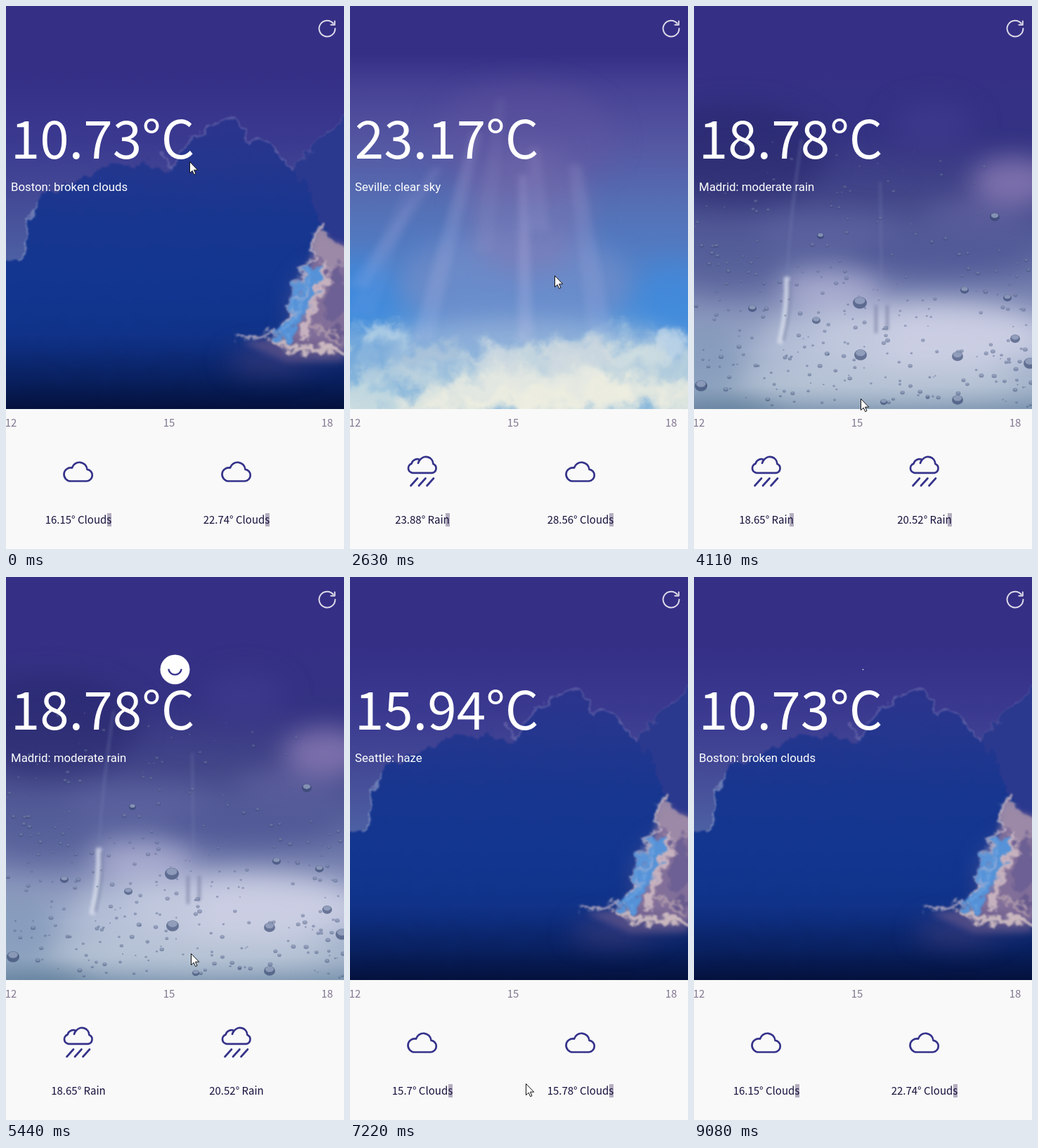
Write an HTML page that moves like this. It is 481 px wide and 772 px high and loops after 9160 ms.

```html
<!DOCTYPE html>
<html lang="en">
<head>
<meta charset="utf-8">
<title>Weather</title>
<style>
html, body { margin: 0; width: 100%; height: 100%; overflow: hidden; background: #f9f9f9; }
svg { position: absolute; left: 0; top: 0; width: 481px; height: 772px; display: block; }
.photo { will-change: transform; }
filter { color-interpolation-filters: sRGB; }
text { font-family: "Noto Sans CJK JP", "Noto Sans CJK SC", "Noto Sans", sans-serif; white-space: pre; }
#temp { font-size: 74.6px; fill: #fff; }
#place { font: 16.8px Roboto, sans-serif; fill: #fff; }
.hour { font-size: 15px; fill: #827691; text-anchor: middle; }
.label { font-size: 15px; fill: #14113c; text-anchor: middle; }
.icon { fill: none; stroke: #35338a; stroke-width: 2.7; stroke-linecap: round; stroke-linejoin: round; }
</style>
</head>
<body>
<svg class="photo" viewBox="0 0 481 772">
  <defs>
    <filter id="rough" x="-10%" y="-10%" width="120%" height="120%">
      <feTurbulence type="fractalNoise" baseFrequency=".045" numOctaves="4" seed="4"/>
      <feDisplacementMap in="SourceGraphic" scale="24" xChannelSelector="R" yChannelSelector="G"/>
      <feGaussianBlur stdDeviation=".9"/>
    </filter>
    <filter id="ragged" x="-20%" y="-20%" width="140%" height="140%">
      <feGaussianBlur stdDeviation="1.5" result="b"/>
      <feTurbulence type="fractalNoise" baseFrequency=".06" numOctaves="4" seed="11"/>
      <feDisplacementMap in="b" scale="32" xChannelSelector="R" yChannelSelector="G"/>
      <feGaussianBlur stdDeviation=".8"/>
    </filter>
    <filter id="puffy" x="-10%" y="-10%" width="120%" height="120%">
      <feGaussianBlur stdDeviation="7" result="b"/>
      <feTurbulence type="fractalNoise" baseFrequency=".03" numOctaves="4" seed="8"/>
      <feDisplacementMap in="b" scale="50" xChannelSelector="R" yChannelSelector="G"/>
    </filter>
    <filter id="soft" x="-50%" y="-50%" width="200%" height="200%"><feGaussianBlur stdDeviation="18"/></filter>
    <filter id="mist" x="-50%" y="-50%" width="200%" height="200%"><feGaussianBlur stdDeviation="5"/></filter>
    <filter id="wetness" x="-50%" y="-50%" width="200%" height="200%"><feGaussianBlur stdDeviation="2"/></filter>
    <filter id="blur"><feGaussianBlur stdDeviation=".7"/></filter>
    <clipPath id="frame"><rect width="481" height="573"/></clipPath>
  </defs>
  <g id="photos" clip-path="url(#frame)"></g>
</svg>
<svg viewBox="0 0 481 772">
  <rect y="573" width="481" height="199" fill="#f9f9f9"/>
  <g fill="none" stroke="#dcd9e8" stroke-width="2" stroke-linecap="round" stroke-linejoin="round">
    <path d="M468.4 32A11.4 11.4 0 1 1 465.8 24.8"/>
    <path d="M467.8 21.5V26.8H462.4"/>
  </g>
  <text id="temp" x="6.8" y="216.6"></text>
  <text id="place" x="7" y="262.5"></text>
  <text class="hour" x="7" y="598">12</text>
  <text class="hour" x="232" y="598">15</text>
  <text class="hour" x="457" y="598">18</text>
  <g id="cards"></g>
  <g id="pull">
    <circle r="28" fill="#fff"/>
    <path d="M-12.3 -1A12.4 12.4 0 0 0 12.3 -1" fill="none" stroke="#35338a" stroke-width="3"/>
  </g>
  <path id="cursor" d="M.5 .5V16.6L4.2 13.2L6.7 18.7L9 17.6L6.5 12.2H11.7Z" fill="#fff" stroke="#111" stroke-width="1"/>
</svg>
<script>
const LOOP = 9160;
const $ = id => document.getElementById(id);

function rng(seed) {
  return () => (seed = (seed * 16807) % 2147483647) / 2147483647;
}
const repeat = (n, fn) => Array.from({ length: n }, (_, i) => fn(i)).join('');

function gradient(id, stops) {
  const marks = stops.map(([y, c, o = 1]) => `<stop offset="${y / 573}" stop-color="${c}" stop-opacity="${o}"/>`);
  return `<linearGradient id="${id}" gradientUnits="userSpaceOnUse" x1="0" y1="0" x2="0" y2="573">${marks.join('')}</linearGradient>`;
}
const fillAll = id => `<rect width="481" height="573" fill="url(#${id})"/>`;
const blob = (x, y, rx, ry, c, o = 1) => `<ellipse cx="${x}" cy="${y}" rx="${rx}" ry="${ry}" fill="${c}" opacity="${o}"/>`;
const shape = (d, c, o = 1) => `<path d="${d}" fill="${c}" opacity="${o}"/>`;
const line = (d, c, w, o = 1) => `<path d="${d}" fill="none" stroke="${c}" stroke-width="${w}" opacity="${o}" stroke-linejoin="round"/>`;
const group = (filter, ...parts) => `<g filter="url(#${filter})">${parts.join('')}</g>`;

function cloudy() {
  const top = 'M-20 372L22 366L30 340Q30 300 46 280Q60 258 90 258Q115 232 160 226Q205 216 232 236Q262 180 300 165Q340 154 346 198Q366 180 384 200Q390 222 412 234Q430 250 440 290L449 312';
  const body = top + 'L455 345L500 360V600H-20Z';
  const ridge = 'M412 234Q424 205 445 190Q462 180 500 145';
  return gradient('dusk', [[0, '#352f85'], [95, '#352f86'], [190, '#3a3990'], [265, '#434895'], [360, '#4d60a3']]) +
    gradient('mass', [[155, '#2d348c'], [230, '#23368e'], [300, '#18368f'], [400, '#123690'], [490, '#0f3186'], [573, '#0a2766']]) +
    gradient('night', [[465, '#020b36', 0], [530, '#020b36', .35], [573, '#020a30', .75]]) +
    fillAll('dusk') +
    group('rough', shape(ridge + 'V360H412Z', '#2a388e'), shape(body, 'url(#mass)'),
      line(ridge, '#6464a6', 2, .5),
      line('M222 206L232 236Q262 180 300 165Q340 154 346 198Q366 180 384 200Q390 222 412 234', '#7b79b4', 2.5, .55),
      line('M22 366L30 340Q30 300 46 280', '#8794c4', 3, .7)) +
    fillAll('night') +
    group('soft', blob(455, 435, 45, 60, '#806b94', .6), blob(375, 505, 60, 16, '#5a4c86', .55)) +
    group('mist', shape('M447 318L462 335L500 345V490L440 492L400 482L408 440L425 390Z', '#85719a', .95),
      shape('M335 478L400 470L481 480V505L400 506Z', '#6d5b8d', .6)) +
    group('ragged',
      shape('M448 306L460 332L500 348V365L470 372L448 366L438 345Z', '#a08da9', .9),
      blob(470, 412, 14, 38, '#665b92', .75), blob(472, 462, 20, 8, '#5f5389', .7),
      line('M448 308L439 345L418 388L404 432L386 466L350 473L326 470', '#d9c8d0', 4, .85),
      line('M460 366L444 402L430 446L424 470', '#d9c4c8', 11, .8),
      line('M384 474L408 488L440 484L490 492', '#e2cfcb', 10, .8),
      line('M430 450L452 462L480 476', '#c6afb5', 5, .7),
      shape('M430 370L456 375L442 397L428 432L416 456L406 478L390 472L381 465L402 440L412 402Z', '#5592d8'),
      line('M436 373L420 402L411 440L397 467', '#7fb0e4', 4, .55),
      line('M428 398L416 416M414 432L398 446', '#b9b4cf', 4, .7));
}

function sunny() {
  const rand = rng(77);
  const ray = (x1, y1, x2, y2, w, o) =>
    shape(`M${x1 - w / 4} ${y1}L${x1 + w / 4} ${y1}L${x2 + w / 2} ${y2}L${x2 - w / 2} ${y2}Z`, '#cfc6ea', o);
  const puffs = (n, y, spread, c, o) => repeat(n, i => {
    const x = i / (n - 1) * 520 - 20;
    return blob(x, y + (rand() - .5) * spread, 18 + rand() * 24, 12 + rand() * 18, c, o);
  });
  return gradient('day', [[0, '#352f85'], [68, '#353086'], [120, '#484395'], [200, '#5558a3'], [290, '#5571b6'], [370, '#5080c8'], [440, '#4a8ed8'], [573, '#8bb9dc']]) +
    fillAll('day') +
    group('soft', blob(235, 395, 165, 75, '#7d8fc6', .6), blob(250, 290, 90, 90, '#8577b0', .45), blob(250, 190, 130, 80, '#67589f', .35),
      blob(8, 410, 55, 50, '#388ae3', .6), blob(460, 415, 50, 50, '#3c8be0', .6), blob(250, 480, 210, 32, '#a9bfdc', .65)) +
    group('mist', ray(180, 180, 103, 475, 30, .16), ray(125, 230, 10, 400, 28, .12), ray(85, 260, 15, 440, 40, .07),
      ray(246, 240, 250, 480, 22, .2), ray(262, 200, 270, 320, 30, .1), ray(320, 225, 358, 480, 36, .12),
      ray(215, 130, 190, 350, 28, .06)) +
    group('puffy', puffs(13, 490, 34, '#a9c8e0', .5), puffs(12, 520, 30, '#cfdddf', .65),
      blob(48, 468, 36, 14, '#bdd6e7', .8), blob(464, 478, 30, 18, '#c3d8e8', .85), blob(410, 495, 44, 17, '#d5e1e2', .8),
      blob(215, 500, 46, 20, '#d8dfe0', .75), blob(325, 497, 55, 20, '#d9dfe0', .8), blob(120, 497, 50, 16, '#b2c7d9', .7),
      blob(270, 545, 130, 28, '#eeeee2', .85), puffs(13, 560, 18, '#f0efe0', .8), blob(25, 555, 45, 22, '#b4d3e0', .6));
}

function rainy() {
  const rand = rng(2024);
  const drop = (x, y, r, o) =>
    blob(x, y, r, r * .85, '#34456f', o) + blob(x, y - r * .3, r * .75, r * .5, '#a9b5d0', o);
  const small = repeat(300, () => {
    const y = 140 + Math.sqrt(rand()) * 430;
    return drop(rand() * 481, y, 1 + rand() * 2.6, .12 + .35 * (y - 140) / 430);
  });
  const large = [[236, 422, 10], [237, 496, 9], [375, 498, 8], [10, 540, 9], [478, 508, 9], [446, 415, 6], [457, 473, 7],
    [385, 404, 6], [375, 560, 8], [174, 447, 6], [428, 300, 7], [83, 430, 6], [270, 563, 5], [180, 327, 5]];
  return gradient('storm', [[0, '#352f85'], [90, '#353085'], [180, '#343283'], [270, '#434789'], [350, '#5a649d'], [420, '#7e89b4'], [490, '#a6b3ce'], [540, '#a3b4ca'], [573, '#7f97b1']]) +
    fillAll('storm') +
    group('soft', blob(60, 210, 130, 70, '#28286d', .6), blob(455, 250, 60, 34, '#8d7cb6', .8), blob(340, 170, 60, 35, '#423d90', .6),
      blob(400, 295, 70, 22, '#6a68a6', .5), blob(190, 320, 100, 25, '#6469a5', .5), blob(350, 355, 130, 30, '#4d5594', .65),
      blob(50, 370, 80, 40, '#4c5792', .5), blob(195, 402, 75, 24, '#b4b5d6', .8), blob(340, 470, 170, 48, '#d0d2e6', .9),
      blob(190, 470, 90, 45, '#bcc6dc', .7), blob(270, 535, 200, 28, '#c3cedd', .6),
      blob(15, 500, 60, 50, '#7690b3', .6), blob(40, 580, 80, 18, '#4f708f', .6)) +
    group('wetness', line('M153 190Q138 290 132 385', '#7781b4', 2.5, .5), line('M132 385Q134 430 122 480', '#dde2ef', 8, .75),
      line('M136 390Q138 432 127 476', '#5b678f', 3, .6), line('M265 250L267 400', '#7a84b5', 3, .35),
      line('M259 425V465M275 425V460', '#7a80a4', 4, .7)) +
    group('blur', small, ...large.map(([x, y, r]) => drop(x, y, r, .65)));
}

const scenes = { cloudy, sunny, rainy };
$('photos').innerHTML = Object.keys(scenes).map(k => `<g id="${k}">${scenes[k]()}</g>`).join('');

const CLOUD = 'M-11 675.5H12A8.4 8.4 0 0 0 12.5 658.8A11 11 0 0 0 -9 656.6A9.55 9.55 0 1 0 -11 675.5Z';
const SHOWER = 'M-14 663.8A6.8 6.8 0 0 1 -15.4 650.6A8.4 8.4 0 0 1 -3.4 645.2A10.4 10.4 0 0 1 15.4 651A6.7 6.7 0 0 1 14 663.8ZM-3.4 645.2Q-5.4 647.2 -6 650';
$('cards').innerHTML = [103, 328].map(x => `
  <g class="icon" transform="translate(${x} 0)">
    <path class="dry" d="${CLOUD}"/>
    <path class="wet" d="${SHOWER}M-16.5 682L-7 671.5M-5 682L4.5 671.5M6.5 682L16 671.5"/>
  </g>
  <rect class="mark" y="721" width="6" height="19" fill="#b4adbf"/>
  <text class="label" x="${x}" y="736"></text>`).join('');
const all = name => [...document.querySelectorAll('.' + name)];
const dry = all('dry'), wet = all('wet'), marks = all('mark'), labels = all('label');

const boston = { temp: '10.73', place: 'Boston: broken clouds', scene: 'cloudy', next: ['16.15° Clouds', '22.74° Clouds'] };
const reports = [
  [0, boston],
  [1310, { temp: '23.17', place: 'Seville: clear sky', scene: 'sunny', next: ['23.88° Rain', '28.56° Clouds'] }],
  [3500, { temp: '18.78', place: 'Madrid: moderate rain', scene: 'rainy', next: ['18.65° Rain', '20.52° Rain'] }],
  [5900, { temp: '15.94', place: 'Seattle: haze', scene: 'cloudy', next: ['15.7° Clouds', '15.78° Clouds'] }],
  [8850, boston]
];
// Pointer pressed, circle starts to grow, new report arrives
const pulls = [[380, 480, 1310], [3040, 3110, 3500], [5130, 5250, 5900], [7500, 8470, 8850]];

// Start, end, number of steps, points passed
const moves = [
  [70, 70, 1, [262, 219]],
  [380, 1250, 12, [285, 370], [315, 570], [340, 739]],
  [1940, 2250, 5, [300, 560], [225, 330], [194, 211], [260, 470], [314, 711]],
  [2630, 2870, 4, [291, 383], [225, 130], [212, 70], [230, 120]],
  [3040, 3730, 10, [260, 340], [300, 620], [314, 711], [314, 711]],
  [4110, 4110, 1, [237, 558]],
  [4180, 4810, 9, [226, 380], [232, 254]],
  [5130, 5980, 12, [255, 480], [285, 700], [295, 767]],
  [6590, 6590, 1, [295, 800]],
  [7140, 7850, 10, [250, 720], [100, 500], [0, 400], [60, 224], [215, 753]],
  [8150, 8300, 3, [178, 240], [190, 192], [210, 230]],
  [8470, 8470, 1, [240, 800]]
];

function pointer(t) {
  let pos = [261, 221];
  for (const [start, end, n, ...stops] of moves) {
    if (t < start) break;
    const step = end > start ? Math.min(n, Math.floor((t - start) * (n - 1) / (end - start) + 1e-6) + 1) : n;
    const path = [pos, ...stops];
    const at = step / n * stops.length;
    const i = Math.min(stops.length - 1, Math.floor(at));
    pos = path[i].map((v, k) => v + (path[i + 1][k] - v) * (at - i));
  }
  return pos;
}

function pullScale(t) {
  for (const [, grow, swap] of pulls) {
    if (t >= grow && t < swap) return Math.min(1, (Math.floor((t - grow) / 76) + 1) / 4);
    if (t >= swap && t < swap + 300) return [1, .82, .36, .03][Math.min(3, Math.floor((t - swap) / 76))];
  }
  return 0;
}

const show = (node, on) => node.setAttribute('visibility', on ? 'visible' : 'hidden');

let current = null;
function setReport(r) {
  if (r === current) return;
  current = r;
  $('temp').textContent = r.temp + '°C';
  $('place').textContent = r.place;
  for (const k in scenes) $(k).style.display = k === r.scene ? '' : 'none';
  r.next.forEach((text, i) => {
    const rain = text.endsWith('Rain');
    show(dry[i], !rain);
    show(wet[i], rain);
    labels[i].textContent = text;
    marks[i].setAttribute('x', Math.round([103, 328][i] + labels[i].getComputedTextLength() / 2 - 6));
  });
}

function draw(t) {
  setReport(reports.filter(([at]) => t >= at).pop()[1]);
  const pressed = pulls.some(([down, , swap]) => t >= down && t < swap);
  marks.forEach(m => show(m, !pressed));
  const s = pullScale(t);
  show($('pull'), s > 0);
  $('pull').setAttribute('transform', `translate(240.5 131.5) scale(${s})`);
  const [x, y] = pointer(t);
  $('cursor').setAttribute('transform', `translate(${Math.round(x)} ${Math.round(y)})`);
}

const begin = performance.now();
function tick() {
  draw((performance.now() - begin) % LOOP);
  requestAnimationFrame(tick);
}
tick();
</script>
</body>
</html>
```
